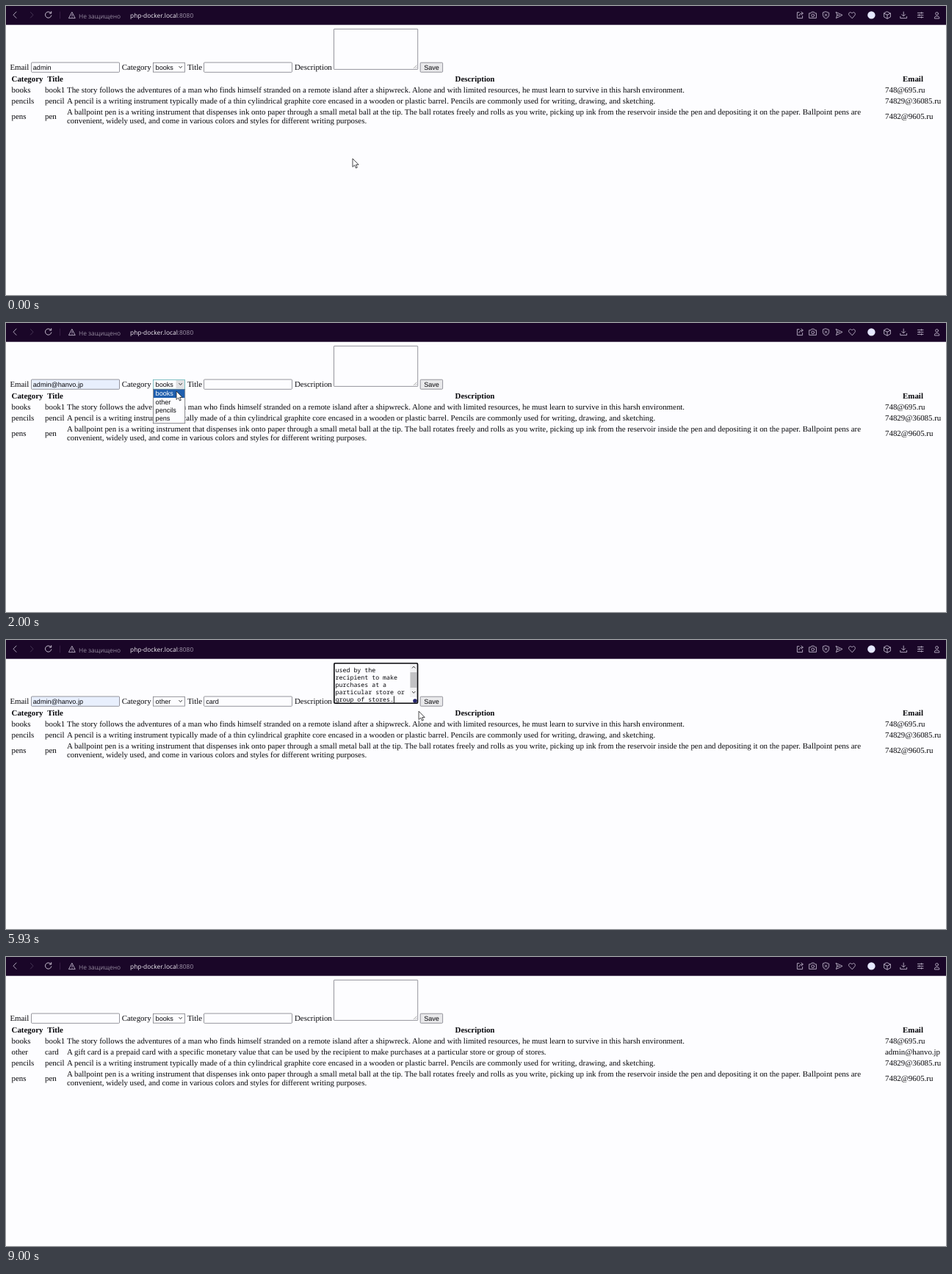
Write an HTML page that moves like this. It is 1280 px wide and 394 px high and loops after 9410 ms.

```html
<!DOCTYPE html>
<html lang="en">
<head>
<meta charset="utf-8">
<title>Form demo</title>
<style>
html, body { margin: 0; width: 100%; height: 100%; overflow: hidden; background: #fdfdff; }
svg { display: block; width: 100%; height: 100%; }
text { font: 10.9px "Liberation Serif", "Times New Roman", serif; fill: #08080c; white-space: pre; text-rendering: geometricPrecision; }
.th { font-weight: bold; text-anchor: middle; }
.ui { font: 9.07px "Liberation Sans", Arial, sans-serif; }
.mono { font: 8.27px "Noto Sans Mono", monospace; }
.bar { font: 8.4px "Open Sans", "Noto Sans", sans-serif; }
.icon { fill: none; stroke: #bdb4c8; stroke-width: .9; stroke-linecap: round; stroke-linejoin: round; }
.field { fill: #fdfdff; stroke: #7c7c84; stroke-width: .8; }
.ring { fill: none; stroke: #0a0a0e; stroke-width: 1.6; }
.caret { stroke: #000; stroke-width: .9; }
.chev { fill: none; stroke: #444; stroke-width: 1; }
</style>
</head>
<body>
<svg id="stage" viewBox="0 0 1280 394" preserveAspectRatio="none"></svg>
<script>
const LOOP = 9410;
const MAIL = "admin@hanvo.jp";
const GIFT = "A gift card is a prepaid card with a specific monetary value that can be used by the recipient to make purchases at a particular store or group of stores.";
const NOTE = ["used by the", "recipient to make", "purchases at a", "particular store or", "group of stores."];
const OPTIONS = ["books", "other", "pencils", "pens"];

// Moments when the page state changes, in ms
const AT = {
  mailFocus: 600, popup: 700, mailPick: 1230, open: 1850, pick: 2700,
  titleFocus: 2930, noteFocus: 5300, paste: 5600, submit: 6730, leave: 9000
};
const TYPED = [3970, 4230, 4270, 4430];

// Pointer path: time, x, y
const PATH = [
  [0, 472, 208], [30, 472, 208], [200, 418, 196], [330, 355, 188], [430, 305, 178],
  [590, 62, 84], [700, 62, 85], [900, 104.5, 95.5], [1000, 106, 98], [1070, 116, 110],
  [1230, 116, 110], [1450, 160, 96], [1630, 215, 88], [1770, 222, 86], [1850, 238, 84],
  [2000, 232, 93], [2430, 232, 93], [2600, 222, 106], [2750, 222, 106], [2920, 288, 86],
  [4930, 288, 86], [5100, 505, 58], [5770, 505, 58], [5930, 562, 97], [6150, 575, 125],
  [6450, 579, 82], [6730, 579, 82], [6930, 565, 180], [7130, 565, 180], [7300, 508, 238],
  [7380, 475, 250], [7500, 385, 247], [7580, 328, 238], [7720, 210, 206], [7800, 120, 150],
  [7870, 93, 136], [8070, 224, 118], [8250, 400, 125], [8450, 525, 175], [8700, 595, 299],
  [8800, 620, 335], [9000, 690, 396]
];

const text = (x, y, s, cls = "", extra = "") => `<text x="${x}" y="${y}" class="${cls}" ${extra}>${s}</text>`;
const rect = (x, y, w, h, cls, extra = "") => `<rect x="${x}" y="${y}" width="${w}" height="${h}" class="${cls}" ${extra}/>`;
const path = (d, extra = "") => `<path d="${d}" ${extra}/>`;
const row = (y, name, title, mail, lines) => {
  const mid = y + (lines.length - 1) * 6.1;
  return text(7.5, mid, name) + text(53, mid, title) + text(1197, mid, mail) +
    lines.map((s, i) => text(83, y + i * 12.2, s)).join("");
};

const toolbar = rect(0, 0, 1280, 25.7, "", 'fill="#1a0628"') +
  '<g class="icon">' +
  path("M14 8L10 12.2L14 16.4") +
  path("M33.5 8.5L37 12.2L33.5 16", 'stroke="#4a3a58"') +
  path("M61 9.4A4.2 4.2 0 1 0 61.8 13M61.7 7.6V10H59.2", 'stroke="#d8d0e0"') +
  path("M73.5 8V17", 'stroke="#3a2248"') +
  path("M90 8.6L94.2 16.6H85.8ZM90 11.5V13.6M90 15V15.2") +
  path("M1080 8.6H1077.4V16.6H1084.6V13.5M1079.8 13.6C1080 11 1082 10 1085 10M1083 8L1085.3 10L1083 12") +
  path("M1094 9.8H1096L1097 8.2H1100.4L1101.4 9.8H1103.4V16.4H1094Z") +
  '<circle cx="1098.7" cy="12.8" r="1.9"/>' +
  path("M1116.5 7.8L1120.6 9.2V12.8Q1120.4 15.6 1116.5 17Q1112.6 15.6 1112.4 12.8V9.2ZM1115 10.8L1118 13.8M1118 10.8L1115 13.8") +
  path("M1130.4 8.4L1139 12.4L1130.4 16.6L1131.8 12.4ZM1131.8 12.4H1135") +
  path("M1152 16.6L1148 12.4C1146.2 9.8 1150 6.8 1152 10C1154 6.8 1157.8 9.8 1156 12.4Z") +
  path("M1200 7.8L1204.4 10V15L1200 17.2L1195.6 15V10ZM1195.6 10L1200 12.2L1204.4 10M1200 12.2V17.2") +
  path("M1222.2 8V13.6M1219.8 11.6L1222.2 14L1224.6 11.6M1217.8 14.4V16.6H1226.6V14.4") +
  path("M1241.4 9.4H1249M1241.4 12.4H1249M1241.4 15.4H1249M1246.6 8.6V10.2M1243.6 11.6V13.2M1246.6 14.6V16.2") +
  '<circle cx="1267.6" cy="10.4" r="1.9"/>' +
  path("M1264.4 16.6V15.8Q1264.6 13.8 1267.6 13.8Q1270.6 13.8 1270.8 15.8V16.6Z") +
  '</g><circle cx="1178.4" cy="12.4" r="5.2" fill="#e6e8ff"/>' +
  text(99, 17, "Не защищено", "bar", 'style="fill:#948a9e"') +
  text(169, 16, 'php-docker.local<tspan fill="#a096aa">:8080</tspan>', "bar", 'style="fill:#f2eef6"');

const form =
  text(5.4, 87, "Email") + text(157.7, 87, "Category") + text(247, 87, "Title") + text(393, 87, "Description") +
  rect(34.5, 77, 120, 13.3, "field", 'id="mailBox" rx="1"') +
  rect(200.5, 77.3, 43, 12.8, "field", 'id="selBox"') +
  rect(231.5, 78, 11.5, 11.4, "", 'id="selBtn" fill="#e0e0e2"') +
  path("M235.4 82L237.6 84.6L239.8 82", 'class="chev"') +
  rect(269.5, 77, 120, 13.3, "field", 'rx="1"') +
  rect(446.5, 31.4, 114.2, 55, "field", 'rx=".5"') +
  path("M555 85L559.4 80.6M557.6 85L559.4 83.2", 'id="grip" stroke="#888" stroke-width=".7"') +
  rect(564.2, 77.2, 30.4, 13, "", 'fill="#e9e9eb" stroke="#7c7c84" stroke-width=".8" rx="1"') +
  text(569.2, 86.9, "Save", "ui") +
  text(36.8, 86.9, "", "ui", 'id="mail"') + text(203.6, 86.9, "", "ui", 'id="sel"') +
  text(272.2, 86.9, "", "ui", 'id="title"');

const note = '<g id="note">' +
  NOTE.map((s, i) => text(448.6, 43.6 + i * 10.2, s, "mono")).join("") +
  rect(550, 33, 10, 45, "", 'fill="#f1f1f3"') + rect(550.5, 44, 9, 21, "", 'fill="#c1c1c4"') +
  path("M553 38.4L555.2 36L557.4 38.4M553 70L555.2 72.4L557.4 70", 'class="chev"') +
  '<circle cx="557" cy="83" r="2.8" fill="#25256e"/></g>';

const rings = rect(35, 77.3, 119.4, 12.9, "ring", 'id="mailRing" rx="1.5"') +
  rect(270, 77.3, 119.4, 12.9, "ring", 'id="titleRing" rx="1.5"') +
  rect(446.9, 31.7, 113.6, 54.6, "ring", 'id="noteRing" rx="1.5"') +
  '<line id="caret" class="caret"/>';

const table = text(29, 102.5, "Category", "th") + text(67, 102.5, "Title", "th") +
  text(638.5, 102.5, "Description", "th") + text(1235, 102.5, "Email", "th") +
  row(117.7, "books", "book1", "748@695.ru", ["The story follows the adventures of a man who finds himself stranded on a remote island after a shipwreck. Alone and with limited resources, he must learn to survive in this harsh environment."]) +
  '<g id="added">' + row(132.7, "other", "card", MAIL, [GIFT]) + '</g><g id="rest">' +
  row(132.7, "pencils", "pencil", "74829@36085.ru", ["A pencil is a writing instrument typically made of a thin cylindrical graphite core encased in a wooden or plastic barrel. Pencils are commonly used for writing, drawing, and sketching."]) +
  row(147.7, "pens", "pen", "7482@9605.ru", [
    "A ballpoint pen is a writing instrument that dispenses ink onto paper through a small metal ball at the tip. The ball rotates freely and rolls as you write, picking up ink from the reservoir inside the pen and depositing it on the paper. Ballpoint pens are",
    "convenient, widely used, and come in various colors and styles for different writing purposes."]) + '</g>';

const overlays = '<g id="popup">' + path("M88.5 97L94.3 91.6L100 97Z") + rect(80, 96.3, 107, 25.7, "", 'rx="3"') +
  text(88.6, 112.6, MAIL, "bar", 'style="fill:#fff;font-size:7.75px"') + '</g>' +
  '<g id="menu">' + rect(200.5, 90.4, 43.2, 46.4, "", 'fill="#fdfdff" stroke="#6c6c70" stroke-width=".8"') +
  rect(201, 90.6, 42.2, 11.4, "", 'id="hot" fill="#1f5fae"') +
  OPTIONS.map((s, i) => text(203.6, 99.3 + i * 11.35, s, "ui", 'id="opt' + i + '"')).join("") + '</g>' +
  path("M0 0V11.4L2.7 8.9L4.5 13L6.3 12.2L4.6 8.3H8.1Z", 'id="arrow" fill="#fff" stroke="#1a1a1c" stroke-width=".8"') +
  path("M-2.4 -5H-.5Q0 -5 0 -4.4Q0 -5 .5 -5H2.4M0 -4.4V4.4M-2.4 5H-.5Q0 5 0 4.4Q0 5 .5 5H2.4", 'id="beam" fill="none" stroke="#111" stroke-width=".9"');

const stage = document.getElementById("stage");
stage.innerHTML = toolbar + form + note + rings + table + overlays;

const el = {};
stage.querySelectorAll("[id]").forEach(n => el[n.id] = n);
const show = (id, on) => el[id].style.display = on ? "" : "none";
const inside = (x, y, l, t, r, b) => x > l && x < r && y > t && y < b;
const between = (t, a, b) => t >= a && t < b;
const write = (id, s) => { if (el[id].textContent !== s) el[id].textContent = s; };

function pointer(t) {
  const i = PATH.findIndex(p => p[0] > t);
  if (i < 0) return PATH[PATH.length - 1].slice(1);
  const [t0, x0, y0] = PATH[i - 1], [t1, x1, y1] = PATH[i];
  const k = (t - t0) / (t1 - t0);
  return [x0 + (x1 - x0) * k, y0 + (y1 - y0) * k];
}

function drawCaret(t, focus, letters) {
  let x, y = 79, h = 9.4, since;
  if (focus === "mail") {
    x = t < AT.mailPick ? 62 : 102.5;
    since = t < AT.mailPick ? AT.mailFocus : AT.mailPick;
  } else if (focus === "title") {
    x = [272.4, 276.9, 281.9, 284.9, 290][letters];
    since = letters ? TYPED[letters - 1] : AT.titleFocus + 40;
  } else if (focus === "note") {
    const full = t >= AT.paste;
    x = full ? 528.4 : 449;
    y = full ? 76.4 : 34.6;
    since = full ? AT.paste : AT.noteFocus;
  }
  const on = focus && Math.floor(Math.max(0, t - since) / 500) % 2 === 0;
  show("caret", on);
  if (!on) return;
  const c = el.caret;
  c.setAttribute("x1", x); c.setAttribute("x2", x);
  c.setAttribute("y1", y); c.setAttribute("y2", y + h);
}

function render(t) {
  const saved = t >= AT.submit;
  const letters = TYPED.filter(a => t >= a).length;
  const open = between(t, AT.open, AT.pick);
  const filled = between(t, AT.mailPick, AT.submit);
  const pasted = between(t, AT.paste, AT.submit);
  const focus = between(t, AT.mailFocus, AT.open) ? "mail"
    : between(t, AT.titleFocus, AT.noteFocus) ? "title"
    : between(t, AT.noteFocus, AT.submit) ? "note" : "";

  write("mail", saved ? "" : filled ? MAIL : "admin");
  write("sel", between(t, AT.pick, AT.submit) ? "other" : "books");
  write("title", saved ? "" : "card".slice(0, letters));
  el.mailBox.style.fill = filled ? "#e8effd" : "";
  el.selBox.style.stroke = open ? "#5fb0b4" : "";
  show("selBtn", open);
  show("note", pasted);
  show("grip", !pasted);
  for (const id of ["mail", "title", "note"]) show(id + "Ring", focus === id);
  drawCaret(t, focus, letters);

  show("added", saved);
  el.rest.setAttribute("transform", `translate(0 ${saved ? 15 : 0})`);
  show("popup", between(t, AT.popup, AT.mailPick));

  const [x, y] = pointer(t);
  const hot = y > 102 ? 1 : 0;
  show("menu", open);
  el.hot.setAttribute("y", 90.6 + hot * 11.35);
  OPTIONS.forEach((_, i) => el["opt" + i].style.fill = i === hot ? "#fff" : "");

  const overText = inside(x, y, 34, 77, 155, 91) || inside(x, y, 269, 77, 390, 91) || inside(x, y, 446, 31, 561, 87);
  const visible = t < AT.leave && !between(t, TYPED[0], 4930);
  show("arrow", visible && !overText);
  show("beam", visible && overText);
  el[overText ? "beam" : "arrow"].setAttribute("transform", `translate(${x} ${y})`);
}

const start = performance.now();
function tick() {
  render((performance.now() - start) % LOOP);
  requestAnimationFrame(tick);
}
tick();
</script>
</body>
</html>
```
